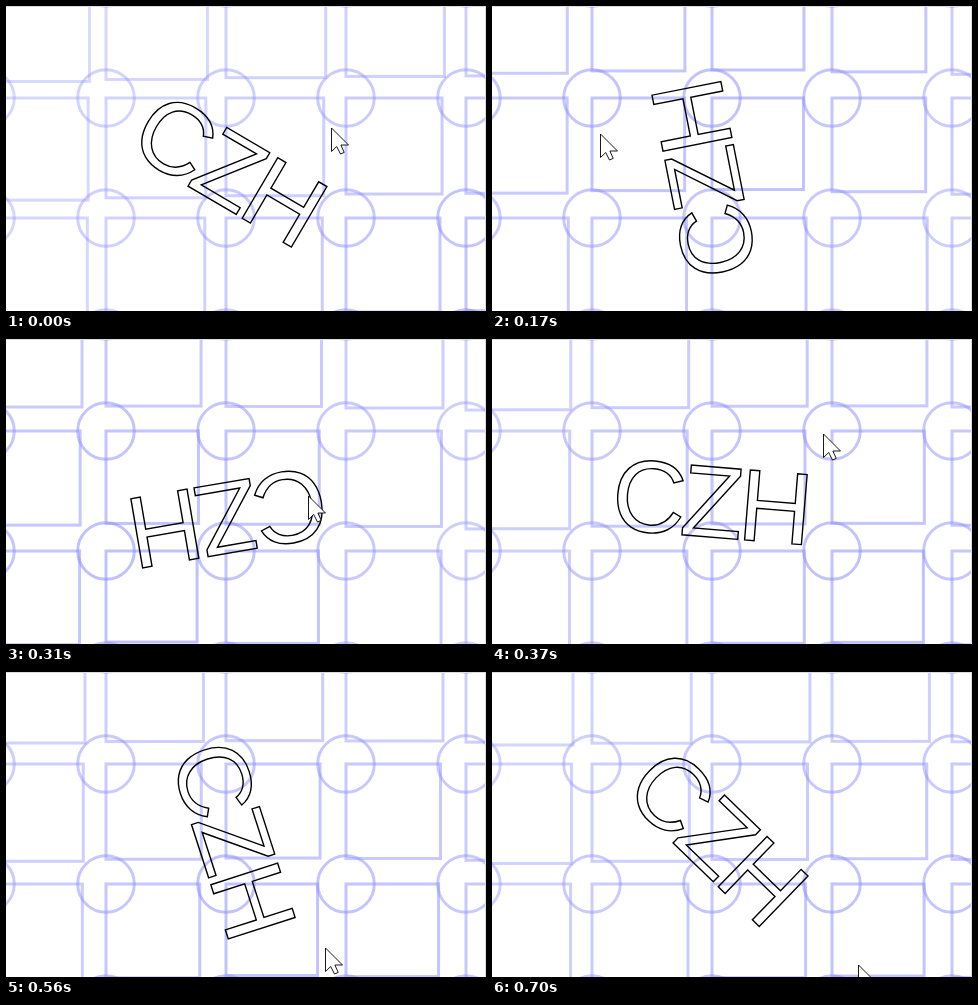
Animation of 480 by 305 pixels, one loop 0.76 s. Source, as an HTML page with a canvas:

```html
<!DOCTYPE html>
<html lang="en">
<head>
<meta charset="utf-8">
<title>Pointer grid</title>
<style>
  html, body { margin: 0; width: 480px; height: 305px; overflow: hidden; background: #fff; }
  canvas { display: block; }
</style>
</head>
<body>
<canvas id="stage" width="480" height="305"></canvas>
<script>
const ctx = document.getElementById('stage').getContext('2d');
const LOOP = 760;
const CELL = 120;
const PIVOT = { x: 220, y: 171 };

// The drawing reacts to the pointer one step late, so each step has an aim and a tip.
const steps = [
  { at: 0,   aim: [470, 318], tip: [326, 122] },
  { at: 70,  aim: [322, 118], tip: [200, 52] },
  { at: 170, aim: [195, 44],  tip: [109, 128] },
  { at: 230, aim: [113, 132], tip: [126, 188] },
  { at: 310, aim: [126, 187], tip: [303, 157] },
  { at: 370, aim: [305, 178], tip: [332, 95] },
  { at: 440, aim: [330, 113], tip: [335, 100] },
  { at: 500, aim: [338, 84],  tip: [247, 261] },
  { at: 560, aim: [249, 261], tip: [320, 276] },
  { at: 630, aim: [313, 275], tip: [348, 290] },
  { at: 700, aim: [346, 293], tip: [367, 293] }
];

const arrow = [[0, 0], [0, 23.5], [5.2, 18.5], [9, 26], [12.7, 24.4], [9.4, 17], [17, 17]];

// Cells grow and fade with their distance from the aim.
function drawGrid([ax, ay]) {
  ctx.lineWidth = 3;
  for (let x = -20; x < 500; x += CELL) {
    for (let y = -28; y < 360; y += CELL) {
      const distance = Math.hypot(ax - x, ay - y);
      const size = 90.3 + 0.022 * distance;
      ctx.strokeStyle = `rgba(144, 144, 255, ${0.57 - 0.0004 * distance})`;
      ctx.strokeRect(x, y, size, size);
      ctx.beginPath();
      ctx.arc(x, y, 28.3, 0, Math.PI * 2);
      ctx.stroke();
    }
  }
}

function drawWord([ax, ay]) {
  ctx.save();
  ctx.translate(PIVOT.x, PIVOT.y);
  ctx.rotate(Math.atan2(ay - PIVOT.y, ax - PIVOT.x));
  ctx.font = '102px "Liberation Sans", Arial, sans-serif';
  ctx.letterSpacing = '-4.5px';
  ctx.strokeStyle = '#000';
  ctx.lineWidth = 1.4;
  ctx.strokeText('CZH', -100.4, 27.2);
  ctx.restore();
}

function drawPointer([x, y]) {
  ctx.beginPath();
  for (const [dx, dy] of arrow) ctx.lineTo(x + dx - 0.5, y + dy);
  ctx.closePath();
  ctx.fillStyle = '#fff';
  ctx.fill();
  ctx.strokeStyle = '#000';
  ctx.lineWidth = 0.9;
  ctx.stroke();
}

function drawBorder() {
  ctx.fillStyle = '#dcdcdc';
  ctx.fillRect(0, 0, 480, 1);
  ctx.fillRect(479, 0, 1, 305);
}

function draw(now) {
  const time = now % LOOP;
  const step = steps.findLast(s => s.at <= time) || steps[0];
  ctx.fillStyle = '#fff';
  ctx.fillRect(0, 0, 480, 305);
  drawGrid(step.aim);
  drawWord(step.aim);
  drawPointer(step.tip);
  drawBorder();
}

let start;
function tick(now) {
  start ??= now;
  draw(Math.max(0, now - start));
  requestAnimationFrame(tick);
}
draw(0);
requestAnimationFrame(tick);
</script>
</body>
</html>
```
